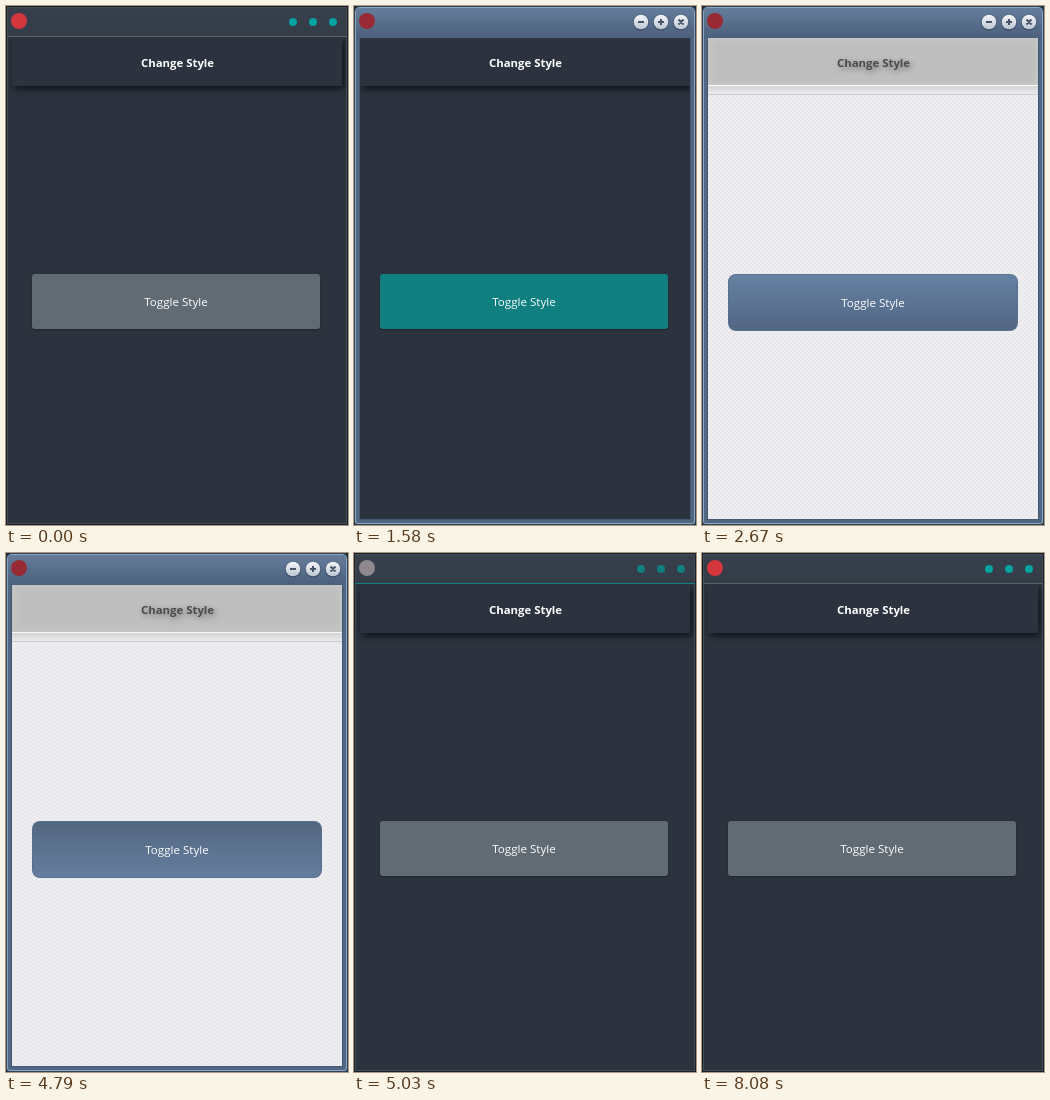
Recreate the animation shown at these times as an HTML page with a canvas. Size 342 px wide and 519 px high, loop 8.21 s.

```html
<!DOCTYPE html>
<html lang="en">
<head>
<meta charset="utf-8">
<title>Change Style</title>
<style>
  html, body { margin: 0; height: 100%; overflow: hidden; background: #2c333e; }
  canvas { display: block; }
</style>
</head>
<body>
<canvas id="stage" width="342" height="519"></canvas>
<script>
const c = document.getElementById('stage').getContext('2d');
const LOOP = 8210;

// start time, window frame, page, button state, extra title bar state
const STEPS = [
  [0, 'dark', 'dark', 'normal', 'plain'],
  [880, 'dark', 'dark', 'hover', 'plain'],
  [1410, 'dark', 'dark', 'hover', 'line'],
  [1440, 'dark', 'dark', 'pressed', 'line'],
  [1580, 'blue', 'dark', 'pressed'],
  [1690, 'blue', 'light', 'normal'],
  [2670, 'blue', 'light', 'hover'],
  [4790, 'blue', 'light', 'pressed'],
  [4920, 'dark', 'light', 'pressed', 'dim'],
  [5030, 'dark', 'dark', 'normal', 'dim'],
  [6410, 'dark', 'dark', 'hover', 'dim'],
  [8080, 'dark', 'dark', 'normal', 'plain']
];
const FLAT = { normal: '#616b74', hover: '#00a2a2', pressed: '#0f7f80' };
const GLOSS = {
  normal: ['#5b7593', '#4c607c'],
  hover: ['#6581a3', '#536684'],
  pressed: ['#52667f', '#657e9f']
};

function rect(x, y, w, h, fill) {
  c.fillStyle = fill;
  c.fillRect(x, y, w, h);
}

function round(x, y, w, h, r, fill) {
  c.beginPath();
  c.roundRect(x, y, w, h, r);
  c.fillStyle = fill;
  c.fill();
}

function disc(x, y, r, fill) {
  c.beginPath();
  c.arc(x, y, r, 0, 7);
  c.fillStyle = fill;
  c.fill();
}

function fade(y0, y1, ...colors) {
  const g = c.createLinearGradient(0, y0, 0, y1);
  colors.forEach((color, i) => g.addColorStop(i / (colors.length - 1), color));
  return g;
}

function label(text, x, y, font, fill) {
  c.font = font + ' "Open Sans", "Noto Sans", sans-serif';
  c.textAlign = 'center';
  c.fillStyle = fill;
  c.fillText(text, x, y);
}

function shadow(color, blur, dx, dy) {
  c.shadowColor = color;
  c.shadowBlur = blur;
  c.shadowOffsetX = dx;
  c.shadowOffsetY = dy;
}

function makeWeave() {
  const tile = document.createElement('canvas');
  tile.width = tile.height = 4;
  const t = tile.getContext('2d');
  t.fillStyle = '#efeff1';
  t.fillRect(0, 0, 4, 4);
  for (let i = 0; i < 4; i++) {
    t.fillStyle = i % 2 ? '#e3e3e5' : '#dfdfe1';
    t.fillRect(i, i, 1, 1);
  }
  return c.createPattern(tile, 'repeat');
}
const weave = makeWeave();

function darkFrame(bar) {
  rect(0, 0, 342, 519, '#171e27');
  rect(1, 1, 340, 517, '#424c57');
  rect(2, 2, 338, 515, '#2c333e');
  rect(2, 2, 338, 28, fade(2, 30, '#373f4c', '#343c48'));
  rect(1, 30, 340, 1, bar === 'plain' ? '#59616a' : '#0f7f80');
  const dim = bar === 'dim';
  disc(13, 15, 8, dim ? '#8f888c' : '#d3373d');
  for (const x of [287, 307, 327]) disc(x, 16, 4, dim ? '#0f7f80' : '#00a2a2');
}

function blueFrame() {
  rect(0, 0, 342, 519, '#1f2a37');
  round(0, 0, 342, 519, [6, 6, 3, 3], '#33445a');
  round(1, 1, 340, 517, [5, 5, 3, 3], '#8ea5bf');
  round(2, 2, 338, 515, [4, 4, 2, 2], '#506784');
  round(2, 2, 338, 30, [4, 4, 0, 0], fade(2, 32, '#647c9b', '#4b607c'));
  rect(5, 32, 332, 482, '#445873');
  disc(13, 15, 8, '#982a35');
  for (const x of [287, 307, 327]) {
    disc(x, 16.5, 8, '#3c4e66');
    disc(x, 16, 7.3, fade(9, 23, '#f4f6f8', '#bdc7d3'));
  }
  c.strokeStyle = '#46546a';
  c.lineWidth = 2;
  c.beginPath();
  for (const [x0, y0, x1, y1] of [
    [284, 16, 290, 16], [304, 16, 310, 16], [307, 13, 307, 19],
    [324.5, 13.5, 329.5, 18.5], [329.5, 13.5, 324.5, 18.5]
  ]) {
    c.moveTo(x0, y0);
    c.lineTo(x1, y1);
  }
  c.stroke();
}

function darkPage(state, framed) {
  c.save();
  c.beginPath();
  if (framed) c.rect(6, 32, 330, 481);
  else c.rect(2, 32, 338, 485);
  c.clip();
  rect(6, 32, 330, 481, '#2c333e');
  shadow('rgba(0,0,0,.65)', 7, 2, 3);
  rect(6, 32, 330, 48, '#2c333e');
  c.restore();
  rect(6, 32, 330, 48, '#2c333e');
  label('Change Style', 171.5, 61, '700 11.4px', '#fff');
  c.save();
  shadow('rgba(0,0,0,.3)', 2, 0, 1);
  round(26, 268, 288, 55, 3, FLAT[state]);
  c.restore();
  label('Toggle Style', 170, 300, '11.6px', '#fff');
}

function lightPage(state) {
  rect(6, 32, 330, 481, weave);
  rect(6, 32, 330, 48, 'rgba(150,150,150,.52)');
  // soft light along the header edges
  c.save();
  c.beginPath();
  c.rect(6, 32, 330, 48);
  c.clip();
  shadow('rgba(255,255,255,.6)', 9, 0, 0);
  c.lineWidth = 2;
  c.strokeStyle = 'rgba(235,235,235,.8)';
  c.strokeRect(5, 31, 332, 50);
  c.restore();
  rect(6, 79, 330, 1, '#fafafa');
  rect(6, 80, 330, 8, fade(80, 88, 'rgba(205,205,207,.75)', 'rgba(235,235,237,.75)'));
  rect(6, 88, 330, 1, '#cbcbcd');
  c.save();
  shadow('rgba(70,70,70,.7)', 6, 2, 2);
  label('Change Style', 171.5, 61, '700 11.4px', '#4b4b4b');
  c.restore();
  round(26, 268, 290, 57, 8, '#56708f');
  round(27, 269, 288, 55, 7, fade(269, 324, ...GLOSS[state]));
  label('Toggle Style', 171, 301, '11.6px', '#fff');
}

function draw(now) {
  const t = now % LOOP;
  const [, frame, page, state, bar] = STEPS.findLast(step => step[0] <= t);
  if (frame === 'dark') darkFrame(bar);
  else blueFrame();
  if (page === 'dark') darkPage(state, frame === 'blue');
  else lightPage(state);
}

const start = performance.now();
function tick() {
  draw(performance.now() - start);
  requestAnimationFrame(tick);
}
tick();
</script>
</body>
</html>
```
